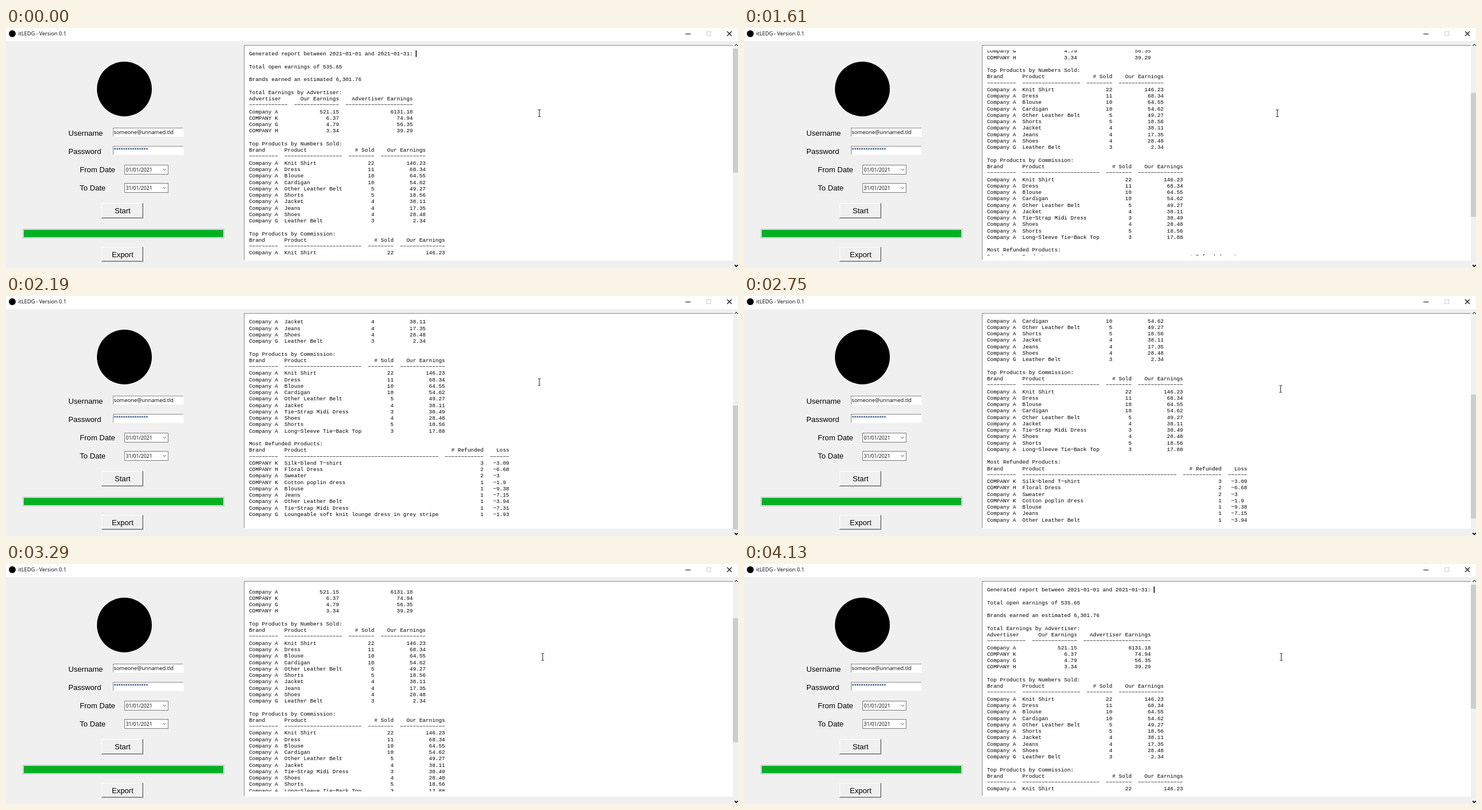
An HTML page with a canvas for the animation above (4.53 s loop, 1280 by 421 pixels).

```html
<!DOCTYPE html>
<html lang="en">
<head>
<meta charset="utf-8">
<title>Report</title>
<style>
html, body { margin: 0; width: 100%; height: 100%; overflow: hidden; background: #f0f0f0; }
canvas { display: block; }
</style>
</head>
<body>
<canvas id="stage" width="1280" height="421"></canvas>
<script>
const ctx = document.getElementById('stage').getContext('2d');
const LOOP = 4530, NOTCH = 32.2, END = 259, LINE = 11.255;
const MONO = '9.375px "Liberation Mono", monospace';
const SANS = '13.1px "Liberation Sans", sans-serif';
const ui = size => `${size}px "Open Sans", sans-serif`;

// Column widths; the first `left` columns are left-aligned.
function table(title, heads, widths, left, rows) {
  const row = cells => cells.map((c, i) =>
    i < left ? c.padEnd(widths[i]) : c.padStart(widths[i])).join('  ');
  return [title, row(heads), widths.map(w => '-'.repeat(w)).join('  '),
    ...rows.map(r => row(r.split('|'))), ''];
}

const sales = ['Brand', 'Product', '# Sold', 'Our Earnings'];
const top5 = ['Company A|Knit Shirt|22|146.23', 'Company A|Dress|11|68.34',
  'Company A|Blouse|10|64.55', 'Company A|Cardigan|10|54.62',
  'Company A|Other Leather Belt|5|49.27'];

const report = [
  'Generated report between 2021-01-01 and 2021-01-31:', '',
  'Total open earnings of 535.65', '',
  'Brands earned an estimated 6,301.76', '',
  ...table('Total Earnings by Advertiser:',
    ['Advertiser', 'Our Earnings', 'Advertiser Earnings'], [12, 14, 21], 1,
    ['Company A|521.15|6131.18', 'COMPANY K|6.37|74.94',
      'Company G|4.79|56.35', 'COMPANY H|3.34|39.29']),
  ...table('Top Products by Numbers Sold:', sales, [9, 18, 8, 14], 2,
    [...top5, 'Company A|Shorts|5|18.56', 'Company A|Jacket|4|38.11',
      'Company A|Jeans|4|17.35', 'Company A|Shoes|4|28.48',
      'Company G|Leather Belt|3|2.34']),
  ...table('Top Products by Commission:', sales, [9, 24, 8, 14], 2,
    [...top5, 'Company A|Jacket|4|38.11', 'Company A|Tie-Strap Midi Dress|3|30.49',
      'Company A|Shoes|4|28.48', 'Company A|Shorts|5|18.56',
      'Company A|Long-Sleeve Tie-Back Top|3|17.88']),
  ...table('Most Refunded Products:', ['Brand', 'Product', '# Refunded', 'Loss'],
    [9, 48, 12, 6], 2,
    ['COMPANY K|Silk-blend T-shirt|3|-3.09', 'COMPANY H|Floral Dress|2|-6.68',
      'Company A|Sweater|2|-3   ', 'COMPANY K|Cotton poplin dress|1|-1.9 ',
      'Company A|Blouse|1|-9.38', 'Company A|Jeans|1|-7.15',
      'Company A|Other Leather Belt|1|-3.94', 'Company A|Tie-Strap Midi Dress|1|-7.31',
      'Company G|Loungeable soft knit lounge dress in grey stripe|1|-1.93'])
].map(str => str.replaceAll('-', '\u2212')); // typewriter-wide dashes

// Times of single wheel notches.
const downs = [690, 770, 1220, 1610, 1690, 1940, 2020, 2110, 2190];
const ups = [2750, 2830, 2910, 3210, 3290, 3640, 3720, 3800, 4130];
const pointer = [[0, 932.5, 149.5], [2190, 932.5, 151], [2270, 932.5, 152], [2420, 933.5, 154],
  [2500, 935.5, 158], [2580, 937.5, 161], [2670, 938.5, 163], [3970, 939.5, 163]];

function scrollAt(t) {
  const passed = list => list.filter(x => t >= x).length;
  const down = Math.min(END, passed(downs) * NOTCH);
  return Math.max(0, down - passed(ups) * NOTCH);
}

function rect(x, y, w, h, color) {
  ctx.fillStyle = color;
  ctx.fillRect(x, y, w, h);
}

function text(str, x, y, font, color = '#000') {
  ctx.font = font;
  ctx.fillStyle = color;
  ctx.fillText(str, x, y);
}

function stroke(points, color, width = 1) {
  ctx.beginPath();
  points.forEach(([x, y], i) => i ? ctx.lineTo(x, y) : ctx.moveTo(x, y));
  ctx.strokeStyle = color;
  ctx.lineWidth = width;
  ctx.stroke();
}

function disc(x, y, r) {
  ctx.beginPath();
  ctx.arc(x, y, r, 0, Math.PI * 2);
  ctx.fillStyle = '#000';
  ctx.fill();
}

function bevel(x, y, w, h, light, dark, fill) {
  rect(x, y, w, h, dark);
  rect(x, y, w - 1, h - 1, light);
  rect(x + 1, y + 1, w - 2, h - 2, fill);
}

function chevron(x, y, dir, size, color, width) {
  stroke([[x - size, y - dir * size / 2], [x, y + dir * size / 2],
    [x + size, y - dir * size / 2]], color, width);
}

function button(label, x, y, h, labelX) {
  bevel(x, y, 73, h, '#fff', '#696969', '#f0f0f0');
  stroke([[x + 1, y + h - 1.5], [x + 71.5, y + h - 1.5], [x + 71.5, y + 1]], '#b4b4b4');
  text(label, labelX, y + 18, SANS);
}

function entry(y) {
  bevel(187, y, 124, 16, '#8c8c8c', '#f8f8f8', '#fff');
}

function dateBox(str, y) {
  rect(207, y, 77, 17, '#7a7a7a');
  rect(208, y + 1, 75, 15, '#fff');
  text(str, 209.5, y + 11.5, ui(8.7));
  chevron(277, y + 8.5, 1, 2.6, '#444', 1);
}

function drawTitleBar() {
  rect(0, 0, 1280, 23, '#fff');
  disc(11, 10, 6);
  text('itLEDG - Version 0.1', 21.5, 13.3, ui(9.2));
  rect(1188, 10, 9, 1, '#000');
  ctx.strokeStyle = '#ccc';
  ctx.lineWidth = 1;
  ctx.strokeRect(1225.5, 6.5, 7, 7);
  stroke([[1261, 6], [1269, 14]], '#000', 1.1);
  stroke([[1269, 6], [1261, 14]], '#000', 1.1);
}

function drawForm() {
  disc(207, 107, 48);
  text('Username', 109, 189, SANS);
  text('Password', 109, 221, SANS);
  text('From Date', 129, 253, SANS);
  text('To Date', 129, 285, SANS);
  entry(175);
  entry(207);
  text('someone@unnamed.tld', 188.5, 186, ui(9.3));
  text('*'.repeat(15), 188.5, 218, '10.3px "Liberation Sans", sans-serif', '#0a2f6c');
  dateBox('01/01/2021', 240);
  dateBox('31/01/2021', 272);
  button('Start', 167, 307, 27, 190);
  button('Export', 167, 384, 26, 185);
  rect(29, 352, 353, 17, '#c4c4c4');
  rect(30, 353, 351, 15, '#eee');
  rect(31, 354, 349, 13, '#06b025');
}

function drawReport(scroll, caret) {
  bevel(416, 30, 856, 378, '#8a8a8a', '#fff', '#fff');
  ctx.save();
  ctx.beginPath();
  ctx.rect(417, 39, 854, 360);
  ctx.clip();
  report.forEach((str, i) => text(str, 425, 48.4 + i * LINE - scroll, MONO));
  if (caret) rect(716.5, 39.3 - scroll, 1.5, 11.5, '#000');
  ctx.restore();
}

function drawScrollbar(scroll) {
  rect(1271, 23, 9, 398, '#f0f0f0');
  rect(1271, 36.3 + scroll * 0.602, 9, 217.4, '#cdcdcd');
  chevron(1277, 30, -1, 2.8, '#404040', 1.3);
  chevron(1277, 417, 1, 2.8, '#000', 1.8);
}

function drawPointer(t) {
  const [, x, y] = pointer.filter(p => t >= p[0]).pop();
  stroke([[x, y - 5.5], [x, y + 5.5]], '#222');
  for (const end of [-6, 6]) stroke([[x - 2.5, y + end], [x + 2.5, y + end]], '#333');
}

function draw(t) {
  const scroll = scrollAt(t);
  const caret = !(t >= 140 && t < 450) && !(t >= 3800 && t < 4130);
  rect(0, 0, 1280, 421, '#f0f0f0');
  drawTitleBar();
  drawForm();
  drawReport(scroll, caret);
  drawScrollbar(scroll);
  drawPointer(t);
}

const start = performance.now();
function tick() {
  draw((performance.now() - start) % LOOP);
  requestAnimationFrame(tick);
}
tick();
</script>
</body>
</html>
```
